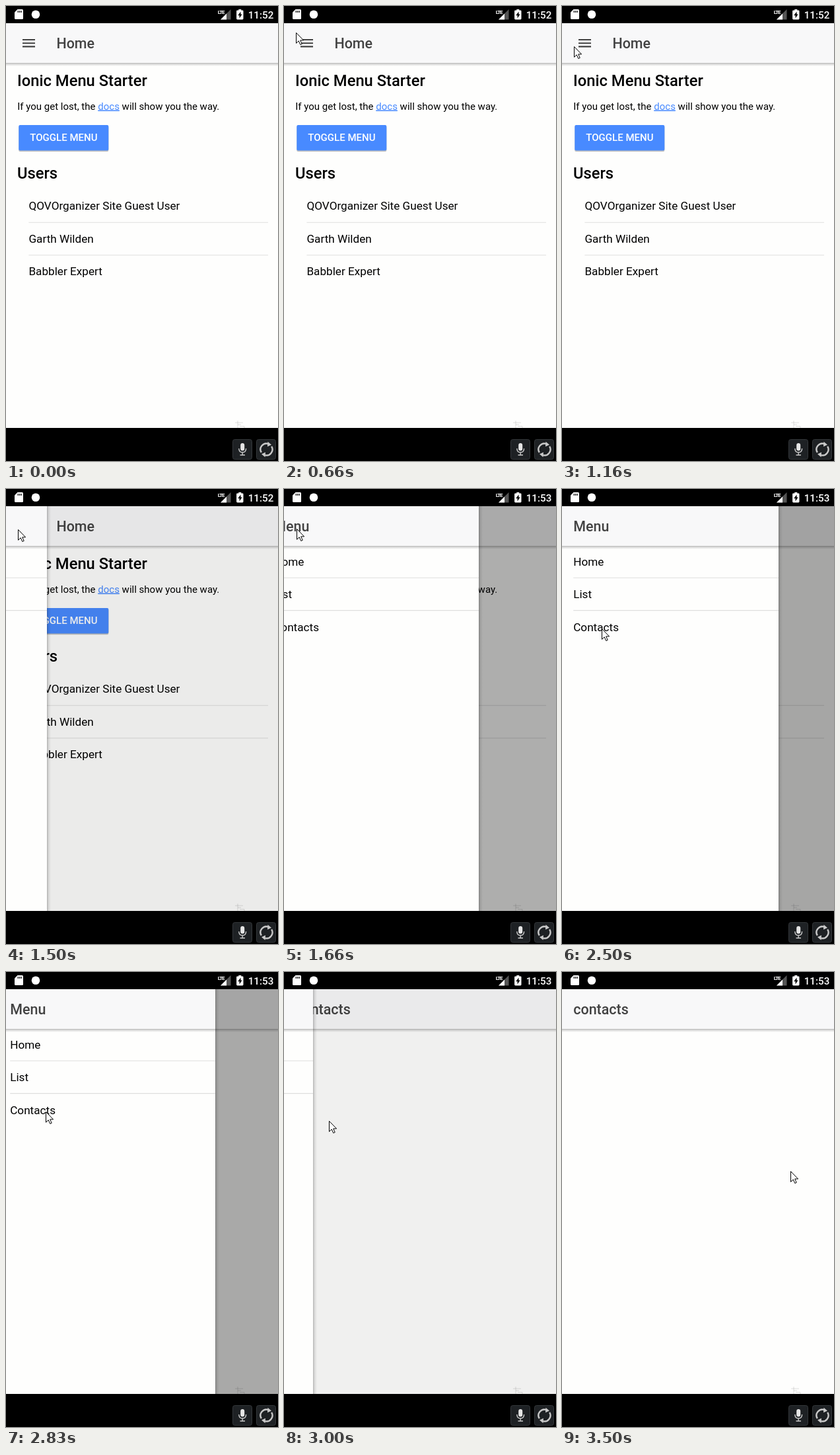
Recreate the animation shown at these times as an HTML page. Size 412 by 688 pixels, loop 6160 ms.

```html
<!DOCTYPE html>
<html lang="en">
<head>
<meta charset="utf-8">
<title>Menu demo</title>
<style>
html, body { margin: 0; width: 100%; height: 100%; overflow: hidden; background: #000; }
svg { display: block; width: 100%; height: 100%; font-family: Roboto, sans-serif; }
.title { font-size: 21.46px; font-weight: 500; fill: #424242; }
.head { font-size: 23.75px; font-weight: 500; }
.item { font-size: 17.17px; }
.body { font-size: 15.02px; }
.rule { stroke: #dedede; stroke-width: 1.1; }
</style>
</head>
<body>
<svg viewBox="0 0 412 688">
  <defs>
    <linearGradient id="down" x2="0" y2="1">
      <stop offset="0" stop-opacity=".27"/>
      <stop offset=".4" stop-opacity=".14"/>
      <stop offset="1" stop-opacity="0"/>
    </linearGradient>
    <linearGradient id="right">
      <stop offset="0" stop-opacity=".26"/>
      <stop offset=".35" stop-opacity=".1"/>
      <stop offset="1" stop-opacity="0"/>
    </linearGradient>
    <clipPath id="screen"><rect y="26" width="412" height="612"/></clipPath>
  </defs>

  <rect width="412" height="688"/>

  <g clip-path="url(#screen)">
    <rect y="26" width="412" height="612" fill="#fefefd"/>
    <rect y="26" width="412" height="60" fill="#f8f8f9"/>
    <rect y="86" width="412" height="5" fill="url(#down)"/>

    <g id="home">
      <path d="M25 51H44M25 56.2H44M25 61.4H44" stroke="#424242" stroke-width="2.1"/>
      <text class="title" x="76.4" y="63.7">Home</text>
      <text class="head" x="17" y="121">Ionic Menu Starter</text>
      <text class="body" x="17.2" y="156.5">If you get lost, the <tspan fill="#488aff" text-decoration="underline">docs</tspan> will show you the way.</text>
      <rect x="19" y="181.5" width="136.5" height="39" rx="2.5" opacity=".1"/>
      <rect x="19.3" y="181" width="136" height="39" rx="2" opacity=".16"/>
      <rect x="19.3" y="180" width="136" height="38.6" rx="2" fill="#488aff"/>
      <text class="body" x="87.4" y="204" text-anchor="middle" font-weight="500" fill="#fff">TOGGLE MENU</text>
      <text class="head" x="17" y="261">Users</text>
      <text class="item" x="34.4" y="308.4">QOVOrganizer Site Guest User</text>
      <text class="item" x="34.4" y="357.9">Garth Wilden</text>
      <text class="item" x="34.4" y="407.4">Babbler Expert</text>
      <path class="rule" d="M34.4 327.3H397M34.4 376.7H397"/>
    </g>

    <text id="contacts" class="title" x="17.2" y="63.7">contacts</text>

    <path d="M347 630H359M351 627V638M351 633H356M354 635.5H361V638" fill="none" stroke="#000" stroke-opacity=".13"/>

    <rect id="shade" y="26" width="412" height="612"/>

    <g id="menu">
      <rect x="328" y="26" width="6" height="612" fill="url(#right)"/>
      <rect y="26" width="328" height="612" fill="#fefefd"/>
      <rect y="26" width="328" height="60" fill="#f8f8f9"/>
      <rect y="86" width="328" height="5" fill="url(#down)"/>
      <text class="title" x="17.2" y="63.7">Menu</text>
      <text class="item" x="17.2" y="115.6">Home</text>
      <text class="item" x="17.2" y="165">List</text>
      <text class="item" x="17.2" y="214.5">Contacts</text>
      <path class="rule" d="M17.2 134.3H328M17.2 183.6H328"/>
    </g>
  </g>

  <!-- status bar -->
  <g fill="#fff">
    <path d="M17.5 5H24.5Q26 5 26 6.5V18.5Q26 20 24.5 20H14.5Q13 20 13 18.5V9.5Z"/>
    <path d="M18.3 7V10M20.7 7V10M23.1 7V10" stroke="#000" stroke-width="1.2"/>
    <circle cx="45" cy="12.7" r="6.3"/>
    <path d="M340.5 5V20.5H325Z" fill="#555"/>
    <path d="M334 11.5V20.5H325Z"/>
    <text x="320.8" y="12" font-size="8" font-weight="700" font-family="Roboto, sans-serif" letter-spacing="-1.1">LTE</text>
    <path d="M352.3 5H356.3V6.5H358.2Q359.5 6.5 359.5 7.8V19Q359.5 20.4 358.2 20.4H350.4Q349.1 20.4 349.1 19V7.8Q349.1 6.5 350.4 6.5H352.3Z"/>
    <path d="M355.5 8.5L351.2 14.2H353.6V18.4L357.6 12.6H355.5Z" fill="#000"/>
    <text id="clock" x="405.3" y="19" text-anchor="end" font-size="15.2" font-weight="500"></text>
  </g>

  <!-- emulator buttons -->
  <g fill="#1e2124" stroke="#34373a">
    <rect x="343.5" y="655.5" width="29" height="30" rx="3"/>
    <rect x="379.5" y="655.5" width="29" height="30" rx="3"/>
  </g>
  <g fill="none" stroke="#c9c9c9">
    <rect x="355.2" y="661" width="6" height="11.5" rx="3" fill="#e6e6e6" stroke="none"/>
    <path d="M352.8 669Q352.8 675 358.2 675T363.6 669M358.2 675V678.5M354.5 679H362" stroke-width="1.4"/>
    <path d="M386.8 675.2A9 9 0 0 1 397.6 662.1M402.2 665.8A9 9 0 0 1 391.4 678.9" stroke-width="2.4"/>
    <path d="M396.5 658.8L402 663.5L396 666.2ZM392.5 682.2L387 677.5L393 674.8Z" fill="#c9c9c9" stroke="none"/>
  </g>

  <path id="cursor" d="M.5 .5V16.3L4.2 12.8L6.8 18.5L9.2 17.4L6.7 11.9H11.6Z" fill="#fff" stroke="#000" stroke-linejoin="round"/>
</svg>

<script>
const LOOP = 6160, MENU = 328;
const $ = id => document.getElementById(id);

// [time, x, y] of the pointer tip; it jumps from place to place
const pointer = [
  [330, 385, 448], [500, 63, 84], [660, 18, 40], [830, 12, 59], [1000, 14, 62],
  [1160, 18, 61], [1660, 19, 60], [1830, 21, 60], [2000, 62, 85], [2160, 91, 181],
  [2330, 79, 199], [2500, 60, 211], [3000, 68, 225], [3160, 208, 309],
  [3330, 351, 344], [3500, 346, 301]
];

// [time, right edge of the menu]
const edges = [
  [0, 0], [1500, 62], [1660, 295], [1830, MENU], [2830, 317], [3000, 44], [3160, 0]
];

const at = (track, t) => track.filter(step => step[0] <= t).pop();
const show = (id, on) => $(id).setAttribute('display', on ? 'inline' : 'none');
const move = (id, x, y) => $(id).setAttribute('transform', `translate(${x} ${y})`);

function draw(t) {
  const edge = at(edges, t)[1];
  const tip = at(pointer, t);
  const left = t >= 2830;

  show('home', !left);
  show('contacts', left);
  show('menu', edge > 0);
  move('menu', edge - MENU, 0);
  $('shade').setAttribute('opacity', edge ? 0.01 + 0.34 * edge / MENU : 0);
  $('clock').textContent = t < 1660 ? '11:52' : '11:53';

  show('cursor', tip);
  if (tip) move('cursor', tip[1], tip[2]);
}

const start = performance.now();
function tick() {
  draw((performance.now() - start) % LOOP);
  requestAnimationFrame(tick);
}
tick();
</script>
</body>
</html>
```
